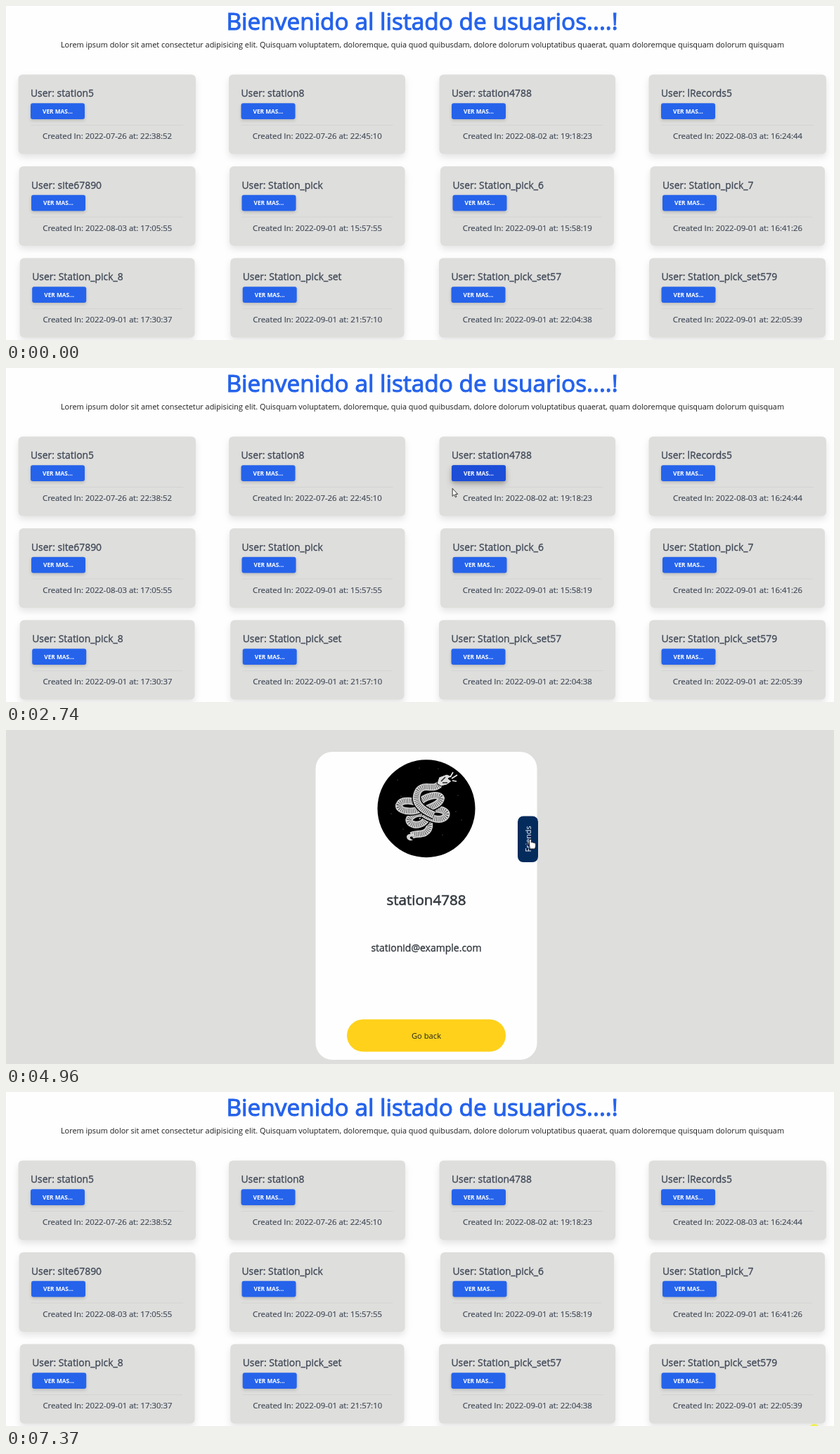
Animation, 1178 px wide and 475 px high, one loop 7420 ms. Source, as an HTML page:

```html
<!DOCTYPE html>
<html lang="es">
<head>
<meta charset="utf-8">
<title>Listado de usuarios</title>
<style>
  html, body { margin: 0; width: 100%; height: 100%; overflow: hidden; background: #fefefe; }
  svg { display: block; width: 1178px; height: 475px; }
  text { font-family: "Open Sans", "Noto Sans", sans-serif; font-weight: 400; white-space: pre; }
  .mid { text-anchor: middle; }
  .heading { font-size: 33.4px; fill: #2563eb; stroke: #2563eb; stroke-width: 1.1px; }
  .intro { font-size: 10.88px; fill: #1b1b1b; }
  .user { font-size: 13.9px; fill: #414a58; stroke: #414a58; stroke-width: .35px; }
  .created { font-size: 11.35px; fill: #414a58; stroke: #414a58; stroke-width: .2px; }
  .more { font-size: 8.3px; font-weight: 700; fill: #fff; }
  .card { fill: #dededc; filter: drop-shadow(0 5px 5px rgba(0,0,0,.1)); }
  .button { fill: #2563eb; filter: drop-shadow(0 2px 2px rgba(0,0,0,.16)); }
  .hover { fill: #1d4ed8; filter: drop-shadow(0 5px 5px rgba(0,0,0,.2)); }
  .name { font-size: 20.6px; fill: #343a40; stroke: #343a40; stroke-width: .6px; }
  .mail { font-size: 14px; fill: #343a40; stroke: #343a40; stroke-width: .35px; }
  .back { font-size: 11.2px; fill: #222; }
  .friends { font-size: 10.8px; fill: #fff; }
  .outline { fill: none; stroke: #000; stroke-width: 13; }
  .skin { fill: none; stroke: #d2d2d2; stroke-width: 10; }
  .scales { fill: none; stroke: #4a4a4a; stroke-width: 7; stroke-dasharray: .8 1.7; }
  .pointer { fill: #fff; stroke: #222; stroke-width: .9; stroke-linejoin: round; }
</style>
</head>
<body>
<svg viewBox="0 0 1178 475">
  <g id="list"></g>
  <g id="profile">
    <rect width="1178" height="475" fill="#dededc"/>
    <rect x="440.5" y="31" width="315" height="438" rx="24" fill="#fefefe"/>
    <g id="avatar">
      <circle cx="598" cy="111.7" r="69.5"/>
      <g id="snake"></g>
    </g>
    <text class="name mid" x="598" y="249">station4788</text>
    <text class="mail mid" x="598" y="315">stationid@example.com</text>
    <rect x="485" y="411.5" width="226" height="46" rx="23" fill="#ffd11b"/>
    <text class="back mid" x="598" y="439">Go back</text>
    <rect x="728" y="122.5" width="29" height="65.5" rx="8" fill="#032b5c"/>
    <text class="friends mid" transform="translate(747.2 155) rotate(-90)">Friends</text>
  </g>
  <circle id="spot" cx="1150" cy="479.5" r="7.5" fill="#efee55"/>
  <g id="cursor">
    <path id="arrow" class="pointer" d="M.5 .5V11.6L3 9.3L4.7 13L6.3 12.3L4.7 8.7H8Z"/>
    <path id="hand" class="pointer" d="M-1.3 8V1Q0-.6 1.3 1V5Q2.7 4 3.8 5.3Q5.2 4.5 6 5.9Q7.5 5.4 7.6 7.2V10Q7.4 12 6.2 14H-.6Q-2-.4 -4.6 8.6Q-4 6.3-1.3 8Z"/>
    <path id="beam" d="M-2-5H-.5L0-4.5L.5-5H2M0-4.5V5M-2 5.5H-.5L0 5L.5 5.5H2" fill="none" stroke="#333"/>
  </g>
</svg>
<script>
const LOOP = 7420, STEP = 50;
const $ = id => document.getElementById(id);
const text = (cls, x, y, words) => `<text class="${cls}" x="${x}" y="${y}">${words}</text>`;
const rect = (cls, x, y, w, h, r, extra = "") =>
  `<rect class="${cls}" x="${x}" y="${y}" width="${w}" height="${h}" rx="${r}" ${extra}/>`;

// Each row: top edge, then cards as [left, right, user, date, time]
const rows = [
  [97.5,
    [17.5, 270, "station5", "2022-07-26", "22:38:52"],
    [317, 568, "station8", "2022-07-26", "22:45:10"],
    [616.5, 867, "station4788", "2022-08-02", "19:18:23"],
    [914.5, 1167, "lRecords5", "2022-08-03", "16:24:44"]],
  [228,
    [18.5, 269.5, "site67890", "2022-08-03", "17:05:55"],
    [318, 567.5, "Station_pick", "2022-09-01", "15:57:55"],
    [618, 865, "Station_pick_6", "2022-09-01", "15:58:19"],
    [916.5, 1165, "Station_pick_7", "2022-09-01", "16:41:26"]],
  [358.5,
    [19.7, 268.5, "Station_pick_8", "2022-09-01", "17:30:37"],
    [319.2, 566.5, "Station_pick_set", "2022-09-01", "21:57:10"],
    [616, 867, "Station_pick_set57", "2022-09-01", "22:04:38"],
    [915, 1166, "Station_pick_set579", "2022-09-01", "22:05:39"]],
];

function card(top, [left, right, user, date, time]) {
  const x = left + 17.5, y = top + 40.7;
  const hover = user === "station4788" ? rect("hover", x, y, 77, 22.7, 3, 'id="hover"') : "";
  return rect("card", left, top, right - left, 113, 6) +
    text("user", x, top + 31.5, "User: " + user) +
    rect("button", x, y, 77, 22.7, 3) + hover +
    text("more mid", x + 38.5, y + 14.6, "VER MAS...") +
    `<path d="M${x} ${top + 72}H${right - 17.5}" stroke="#d3d4d5"/>` +
    text("created mid", (left + right) / 2 + .3, top + 91.5, `Created In: ${date} at: ${time}`);
}

$("list").innerHTML =
  text("heading mid", 592, 33.5, "Bienvenido al listado de usuarios....!") +
  text("intro mid", 592.5, 59, "Lorem ipsum dolor sit amet consectetur adipisicing elit. Quisquam voluptatem, doloremque, quia quod quibusdam, dolore dolorum voluptatibus quaerat, quam doloremque quisquam dolorum quisquam") +
  rows.map(([top, ...cards]) => cards.map(c => card(top, c)).join("")).join("");

// Coils are layered strokes: dark edge, pale skin, dashed scales
const coils = [
  "M589 122C606 127 605 141 596 146C590 149 582 147 577 150",
  "M574 126C582 114 604 118 597 128C588 140 570 134 574 126Z",
  "M597 116C612 109 630 114 626 122C620 131 604 126 594 119",
  "M592 111C576 119 558 115 559 107C562 97 582 100 594 108",
  "M587 105C594 94 617 89 619 97C618 106 603 110 590 115",
  "M609 121C589 113 578 101 587 86C596 75 607 87 617 77",
];
const stars = [[557, 71], [562, 94], [588, 54], [548, 119], [643, 93], [648, 128], [640, 116], [565, 141], [621, 149], [615, 55]];
$("snake").innerHTML =
  stars.map(([x, y]) => `<circle cx="${x}" cy="${y}" r=".6" fill="#777"/>`).join("") +
  coils.map(d => ["outline", "skin", "scales"].map(c => `<path class="${c}" d="${d}"/>`).join("")).join("") +
  `<path d="M579 147Q567 148 571 155Q575 159 579 156Q574 155 575 152Q578 151 582 151Z" fill="#d2d2d2"/>
   <path d="M613 76L616 67L627 63L635 66L629 69L634 73L627 78L619 80Z" fill="#ddd" stroke="#000"/>
   <path d="M619 73L625 67M621 75L628 75" stroke="#222" stroke-width="1.5"/>
   <path d="M632 67L636 60M634 69L642 64M635 72L641 73" stroke="#eee" stroke-width="1.6"/>`;

// Pointer path: time, x, y
const path = [
  [100, 1119, 463], [250, 1119, 463], [600, 860, 290], [850, 640, 122], [1020, 496, 163],
  [1070, 492, 162], [1320, 652, 161], [1420, 652, 161], [1470, 656, 157], [1940, 658, 153],
  [2140, 658, 153], [2740, 633, 172], [3550, 633, 172], [3850, 690, 142], [4100, 746, 155],
  [4960, 746, 155], [5350, 690, 456], [5560, 671, 440], [6110, 671, 440], [6410, 902, 476],
];

function pointerAt(t) {
  const i = path.findIndex(p => p[0] > t);
  if (i < 1) return null;
  const [t0, x0, y0] = path[i - 1], [t1, x1, y1] = path[i];
  const k = (t - t0) / (t1 - t0);
  return [x0 + (x1 - x0) * k, y0 + (y1 - y0) * k];
}

const inside = (x, y, l, t, r, b) => x >= l && x <= r && y >= t && y <= b;
const show = (id, on) => $(id).style.display = on ? "" : "none";

function draw(now) {
  const t = Math.floor((now % LOOP) / STEP + .001) * STEP;
  const profile = t >= 3250 && t < 5910;
  show("list", !profile);
  show("profile", profile);
  show("avatar", t >= 3300);
  show("spot", t >= 7350);
  $("hover").style.opacity = t < 3250 ? Math.min(1, Math.max(0, (t - 1420) / 150)) : 0;

  const at = pointerAt(t);
  show("cursor", at);
  if (at) {
    const [x, y] = at;
    const hand = profile
      ? inside(x, y, 728, 122, 757, 188) || inside(x, y, 485, 412, 711, 457)
      : inside(x, y, 634, 138, 711, 160.5);
    const beam = t >= 5910 && t < 6200;
    $("cursor").setAttribute("transform", `translate(${x} ${y})`);
    show("hand", hand);
    show("beam", beam);
    show("arrow", !hand && !beam);
  }
  requestAnimationFrame(() => draw(performance.now() - start));
}
const start = performance.now();
draw(0);
</script>
</body>
</html>
```
